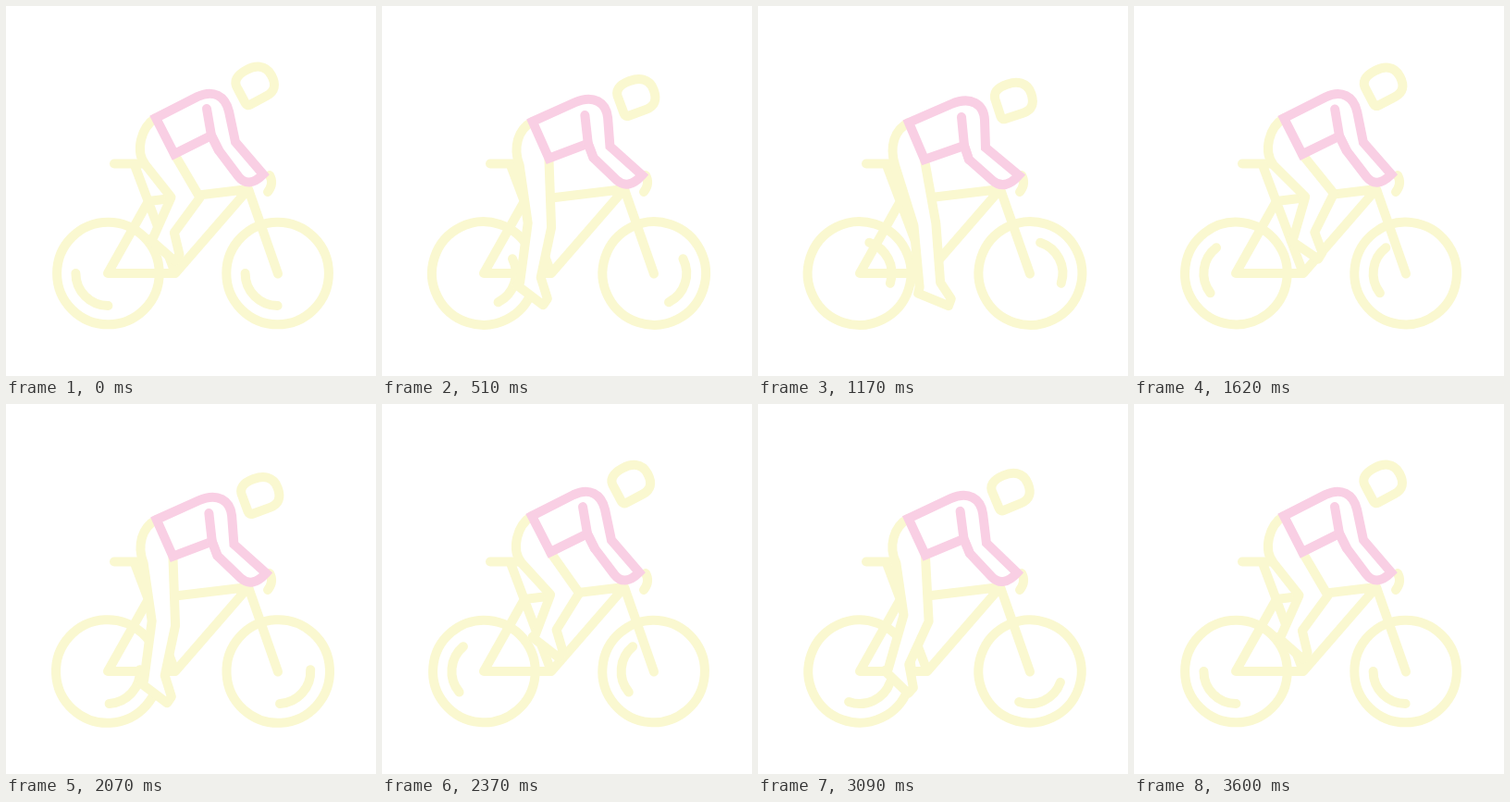
These frames come from a looping animation (400x400 px, 5.63 s). An HTML page:

```html
<!DOCTYPE html>
<html lang="en">
<head>
<meta charset="utf-8">
<title>Cyclist</title>
<style>
html, body { margin: 0; width: 100%; height: 100%; overflow: hidden; background: #fff; }
svg { display: block; width: 100%; height: 100%; }
.line { fill: none; stroke: #faf8d0; stroke-width: 10; stroke-linecap: round; stroke-linejoin: round; }
#leg, #head, #torso { fill: #fff; }
#torso, #arm { stroke: #f9cfe4; }
#torso { stroke-linejoin: miter; }
</style>
</head>
<body>
<svg viewBox="0 0 400 400">
  <g class="line">
    <g class="wheel"><circle/><path d="M-35 0A35 35 0 0 0 0 35"/></g>
    <g class="wheel"><circle/><path d="M-35 0A35 35 0 0 0 0 35"/></g>
    <path d="M117 170.500H150M139 172L183 289H110L154 211L262 198L183 289M262 198L294 289.500"/>
    <path d="M285 183Q290 192 283 201"/>
    <path id="leg"/>
    <path id="head" d="M-18 13Q-18 17 -14 17H6Q21 17 21 0C21 -14 10 -18 0 -18C-12 -18 -19 -14 -18 -4Z"/>
    <path id="torso"/>
    <path id="arm"/>
  </g>
</svg>
<script>
const LOOP = 5630, RIDE = 3600, COAST = 2640, STEP = 30;
const $ = id => document.getElementById(id);
const wheels = document.querySelectorAll('.wheel');

const torsoUp = 'M162 121L207 98C224 90 237 97 241 114L248 147L278 182Q262 198 251 184L230 156L222 140L182 160Z';
const torsoDown = 'M163 126L209 106C230 97 244 106 245 123L246 153L282 183Q267 200 254 189L228 166L223 151L180 166Z';
const armUp = 'M217 111L222 140L230 156';
const armDown = 'M220 120L223 151L228 166';

const mix = (a, b, k) => a + (b - a) * k;

// Blend two paths that share the same commands
function mixPath(a, b, k) {
  const ends = b.match(/\d+/g);
  let i = 0;
  return a.replace(/\d+/g, n => mix(+n, +ends[i++], k).toFixed(2));
}

// Whole turns: steady riding, then slowing down to the fourth turn
function turns(t, period, power) {
  if (t < COAST) return t / period;
  const left = (RIDE - t) / (RIDE - COAST);
  return 4 - (4 - COAST / period) * left ** power;
}

const wave = (phase, mid, size, peak) => mid + size * Math.cos(2 * Math.PI * (phase - peak));

function legPath(p, dip) {
  const ax = wave(p, 178, 28, 0.294), ay = wave(p, 275, 28, 0.544);
  const tilt = wave(p, 33, 16, 0.85) * Math.PI / 180;
  const c = Math.cos(tilt), s = Math.sin(tilt);
  const at = (x, y) => `${(ax + x).toFixed(2)} ${(ay + y).toFixed(2)}`;
  const foot = (x, y) => at(x * c - y * s, x * s + y * c);
  const backKnee = `${wave(p, 173.5, 16.5, 0.2)} ${wave(p, 222, 16, 0.55)}`;
  const frontKnee = `${wave(p, 201, 18, 0.17)} ${wave(p, 221, 19, 0.62)}`;
  const hip = mixPath('M162 121C146 131 139 157 151 172', 'M163 126C147 134 142 152 148 172', dip);
  const waist = mixPath('182 160', '180 166', dip);
  return `${hip}L${backKnee}L${at(-11, 2)}L${foot(-8, 13)}L${foot(27.5, 12.3)}` +
    `L${foot(27, 4)}L${at(11.5, -3)}L${frontKnee}L${waist}`;
}

function draw(now) {
  const t = Math.min(RIDE, Math.floor((now % LOOP) / STEP) * STEP);
  const pedal = turns(t, 780, 1.35);
  const spin = 360 * turns(t, 755, 1.5);
  const dip = wave(pedal, 0.5, -0.5, 0);

  wheels.forEach((w, i) => {
    const x = i ? mix(293.6, 294.4, dip) : mix(110.4, 109.6, dip);
    w.setAttribute('transform', `translate(${x} 289) rotate(${spin})`);
    w.firstChild.setAttribute('r', mix(55.3, 55.9, dip));
  });
  $('leg').setAttribute('d', legPath(pedal, dip));
  $('torso').setAttribute('d', mixPath(torsoUp, torsoDown, dip));
  $('arm').setAttribute('d', mixPath(armUp, armDown, dip));
  $('head').setAttribute('transform',
    `translate(${mix(268.5, 275.5, dip)} ${mix(85, 101.5, dip)}) rotate(${mix(-28, -18, dip)})`);
}

const start = performance.now();
(function tick() {
  draw(performance.now() - start);
  requestAnimationFrame(tick);
})();
</script>
</body>
</html>
```
